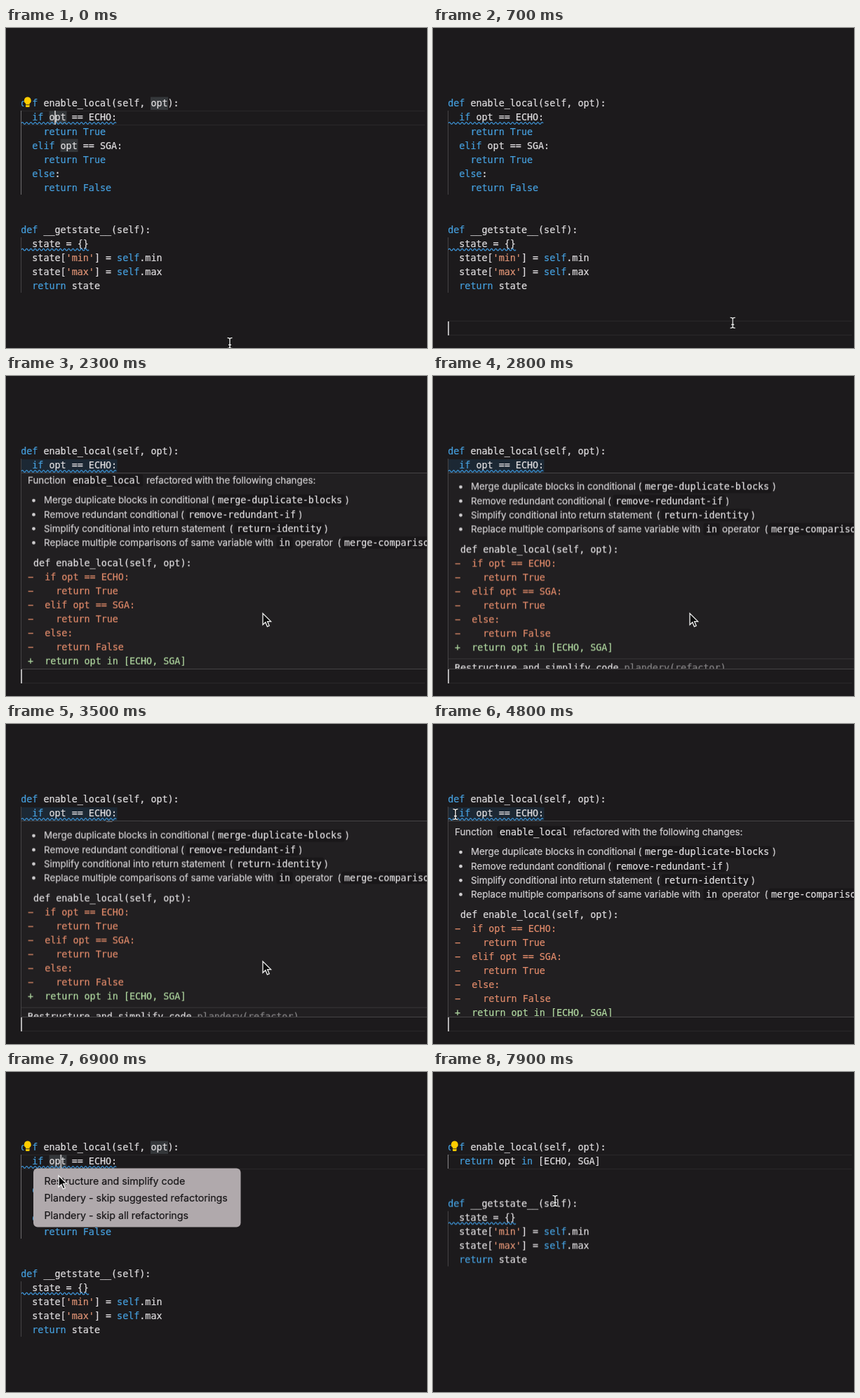
These frames come from a looping animation (600 px wide and 457 px high, 8 s). An HTML page:

```html
<!DOCTYPE html>
<html lang="en">
<head>
<meta charset="utf-8">
<title>Refactoring in the editor</title>
<style>
html, body { margin: 0; width: 100%; height: 100%; overflow: hidden; background: #1c1a1c; }
svg { display: block; width: 600px; height: 457px; }
text { white-space: pre; }
text, tspan { fill: currentColor; stroke: currentColor; stroke-width: .22; }
.mono { font: 13.39px "DejaVu Sans Mono", monospace; color: #dedcde; }
.ui { font: 13.33px Inter, sans-serif; color: #d0ced0; }
.item { font: 14.23px Inter, sans-serif; color: #191719; }
.key { color: #459edc; }
.str { color: #dd9274; }
.del { color: #e08a6a; }
.add { color: #b0d8a0; }
.dim { color: #858385; }
.chip { fill: #191719; }
.mark { fill: #34373a; }
.edge { fill: none; stroke: #2a282a; }
.wave { fill: none; stroke: #3f98dc; stroke-width: 1.2; }
.caret { fill: #b4b3b4; }

.before, .after, .next, .focus, .first, .second, .low, .bulb, .menu, .beam, .arrow {
  animation: 8s step-end infinite;
}
.before { animation-name: before; }
.after { animation-name: after; }
.next { animation-name: next; }
.focus { animation-name: focus; }
.first { animation-name: first; }
.second { animation-name: second; }
.low { animation-name: low; }
.bulb { animation-name: bulb; }
.menu { animation-name: menu; }
.beam { animation-name: beam; }
.arrow { animation-name: arrow; }
.hover { animation: hover 8s linear infinite; }
.scroll { animation: scroll 8s ease-in-out infinite; }
.pointer { animation: pointer 8s ease-in-out infinite; }

@keyframes before { 0% { opacity: 1 } 92.5%, 100% { opacity: 0 } }
@keyframes after { 0% { opacity: 0 } 92.5%, 100% { opacity: 1 } }
@keyframes next { 0% { transform: none } 92.5%, 100% { transform: translateY(-100.4px) } }
@keyframes focus { 0% { opacity: 1 } 6.25% { opacity: 0 } 80%, 100% { opacity: 1 } }
@keyframes first { 0% { opacity: 1 } 6.25%, 100% { opacity: 0 } }
@keyframes second { 0% { opacity: 0 } 80% { opacity: 1 } 92.5%, 100% { opacity: 0 } }
@keyframes low { 0% { opacity: 0 } 6.25% { opacity: 1 } 80%, 100% { opacity: 0 } }
@keyframes bulb { 0% { opacity: 1 } 6.25% { opacity: 0 } 85%, 100% { opacity: 1 } }
@keyframes menu { 0% { opacity: 0 } 86% { opacity: 1 } 91.25%, 100% { opacity: 0 } }
@keyframes beam {
  0% { opacity: 1 } 23% { opacity: 0 } 58.5% { opacity: 1 } 84% { opacity: 0 } 92.5%, 100% { opacity: 1 }
}
@keyframes arrow {
  0% { opacity: 0 } 23% { opacity: 1 } 58.5% { opacity: 0 } 84% { opacity: 1 } 92.5%, 100% { opacity: 0 }
}
@keyframes hover {
  0%, 16.4% { opacity: 0 } 17.5% { opacity: .88 } 18.75%, 72.5% { opacity: 1 } 73.7%, 100% { opacity: 0 }
}
@keyframes scroll {
  0%, 27% { transform: none } 32.5%, 35% { transform: translateY(-24.6px) }
  43.75%, 45% { transform: translateY(-23.5px) } 51.25%, 100% { transform: none }
}
@keyframes pointer {
  0%, 1% { transform: translate(319px, 450px) }
  6%, 7% { transform: translate(488px, 436px) }
  12.5% { transform: translate(204px, 366px) }
  15%, 20% { transform: translate(125px, 128px) }
  27%, 52% { transform: translate(366px, 339px) }
  59%, 60.2% { transform: translate(32px, 129px) }
  62.5%, 67% { transform: translate(34px, 72px) }
  76%, 82% { transform: translate(78px, 128px) }
  84.5%, 85.2% { transform: translate(31px, 107px) }
  86.2% { transform: translate(75px, 148px) }
  90%, 94% { transform: translate(80px, 154px) }
  96% { transform: translate(90px, 146px) }
  98.7%, 100% { transform: translate(174px, 184px) }
}
</style>
</head>
<body>
<svg id="stage" viewBox="0 0 600 457"></svg>
<script>
const LINE = 20.08, CHAR = 8.06;
const escape = s => s.replace(/&/g, '&amp;').replace(/</g, '&lt;');
const text = (x, y, s, cls) => `<text x="${x}" y="${y}" class="${cls}">${s}</text>`;
const rect = (x, y, w, h, cls, more = '') =>
  `<rect x="${x}" y="${y}" width="${w}" height="${h}" class="${cls}" ${more}/>`;
const group = (cls, ...parts) => `<g class="${cls}">${parts.join('')}</g>`;

const paint = s => escape(s)
  .replace(/('\w+')|\b(def|if|elif|else|return|True|False|in|self(?=\.))\b/g,
    (m, str) => `<tspan class="${str ? 'str' : 'key'}">${m}</tspan>`);
const code = (row, lines) => lines
  .map((s, i) => text(21.2, 112.4 + (row + i) * LINE, paint(s), 'mono')).join('');
const wave = (y, w) =>
  `<path class="wave" d="M22 ${y}q1.5-2.8 3 0${'t3 0'.repeat(Math.round(w / 3) - 1)}"/>`;
const guide = (y, h, color) => rect(21, y, 1, h, '', `fill="${color}"`);
const lineEdge = y => `<path class="edge" d="M22 ${y}.5H597M22 ${y + 20}.5H597"/>`;
const mark = (x, y) => rect(x, y, 25, 18.5, 'mark');

const chip = (x, y, s) =>
  rect(x - 3.5, y - 13, s.length * CHAR + 7, 17, 'chip', 'rx="3"') + text(x, y, s, 'mono');
const bullet = (i, label, open, x, name, close) => {
  const y = 187.4 + i * 20.1;
  return `<circle cx="39.5" cy="${y - 4.3}" r="2.4" fill="#d0ced0"/>` + text(54, y, label, 'ui') +
    text(open, y, '(', 'ui') + chip(x, y, name) + text(close, y, ')', 'ui');
};
const diff = [' def enable_local(self, opt):', '−  if opt == ECHO:', '−    return True',
  '−  elif opt == SGA:', '−    return True', '−  else:', '−    return False',
  '+  return opt in [ECHO, SGA]'];
const kind = { '−': ' del', '+': ' add', ' ': '' };

const popup = group('hover',
  rect(21.5, 138.5, 600, 280, '', 'fill="#211f21" stroke="#464446"'),
  '<g clip-path="url(#view)">',
  group('scroll',
    text(31, 158.7, 'Function', 'ui'), chip(95, 158.7, 'enable_local'),
    text(200, 158.7, 'refactored with the following changes:', 'ui'),
    bullet(0, 'Merge duplicate blocks in conditional', 292.5, 302, 'merge-duplicate-blocks', 484),
    bullet(1, 'Remove redundant conditional', 249, 260, 'remove-redundant-if', 417.5),
    bullet(2, 'Simplify conditional into return statement', 318.5, 329, 'return-identity', 454),
    bullet(3, 'Replace multiple comparisons of same variable with', 472.5, 482, 'merge-comparisons', 624),
    chip(389, 247.7, 'in'), text(412, 247.7, 'operator', 'ui'),
    ...diff.map((s, i) => text(31, 276.6 + i * 20.05, s, 'mono' + kind[s[0]])),
    rect(22, 428, 578, 1, '', 'fill="#3a383a"'),
    text(31, 446.2, 'Restructure and simplify code <tspan class="dim">plandery(refactor)</tspan>', 'mono')),
  '</g>');

const menu = group('menu',
  rect(39, 137.5, 295.5, 84, '', 'rx="6" fill="#b0a9ac"'),
  ...['Restructure and simplify code', 'Plandery - skip suggested refactorings',
    'Plandery - skip all refactorings'].map((s, i) => text(54.5, 160.8 + i * 24.5, s, 'item')));

const bulb = group('bulb',
  rect(25.5, 98, 11.5, 17, '', 'fill="#1c1a1c"'),
  '<path fill="#fc0" d="M30.8 98.6a5 5 0 0 1 2.8 9.1v4.2q0 1-1 1h-3.6q-1 0-1-1v-4.2a5 5 0 0 1 2.8-9.1z"/>',
  '<path stroke="#1c1a1c" stroke-width=".8" d="M28 109.7h5.6"/>');

const beamPath = 'M-3.5-7.5Q0-7.5 0-5.5Q0-7.5 3.5-7.5M0-5.5V5.5M-3.5 7.5Q0 7.5 0 5.5Q0 7.5 3.5 7.5M-2 2.5H2';
const pointer = group('pointer',
  group('beam', `<path d="${beamPath}" fill="none" stroke="#000" stroke-width="3"/>`,
    `<path d="${beamPath}" fill="none" stroke="#f2f2f2" stroke-width="1.4"/>`),
  group('arrow', '<path d="M0 0V16.2L3.8 12.7L6.4 18.8L9.2 17.6L6.6 11.6H11.6Z" fill="#0a0a0a" stroke="#f2f2f2" stroke-width="1.3"/>'));

document.getElementById('stage').innerHTML = [
  '<clipPath id="view"><rect x="22" y="139" width="578" height="279"/></clipPath>',
  group('focus', lineEdge(118)),
  group('low', lineEdge(418)),
  group('hover', rect(22, 119, 136.5, 19, '', 'fill="#1c2834"')),
  group('before',
    group('focus', mark(206, 98.5), mark(61.5, 118.5), mark(77.5, 158.5)),
    guide(118, 120, '#454345'), group('focus', guide(118, 120, '#6e6c6e')),
    code(1, ['  if opt == ECHO:', '    return True', '  elif opt == SGA:', '    return True',
      '  else:', '    return False']),
    wave(136, 136)),
  code(0, ['def enable_local(self, opt):']),
  group('after', guide(118, 20, '#8a888a'), code(1, ['  return opt in [ECHO, SGA]'])),
  group('next', guide(299, 79, '#454345'),
    code(9, ['def __getstate__(self):', '  state = {}', "  state['min'] = self.min",
      "  state['max'] = self.max", '  return state']),
    wave(316.6, 96)),
  group('first', rect(69, 118, 2, 20, 'caret')),
  group('second', rect(77.3, 118, 2, 20, 'caret')),
  popup,
  group('low', rect(21, 419, 2, 20, 'caret')),
  bulb, menu, pointer
].join('');
</script>
</body>
</html>
```
